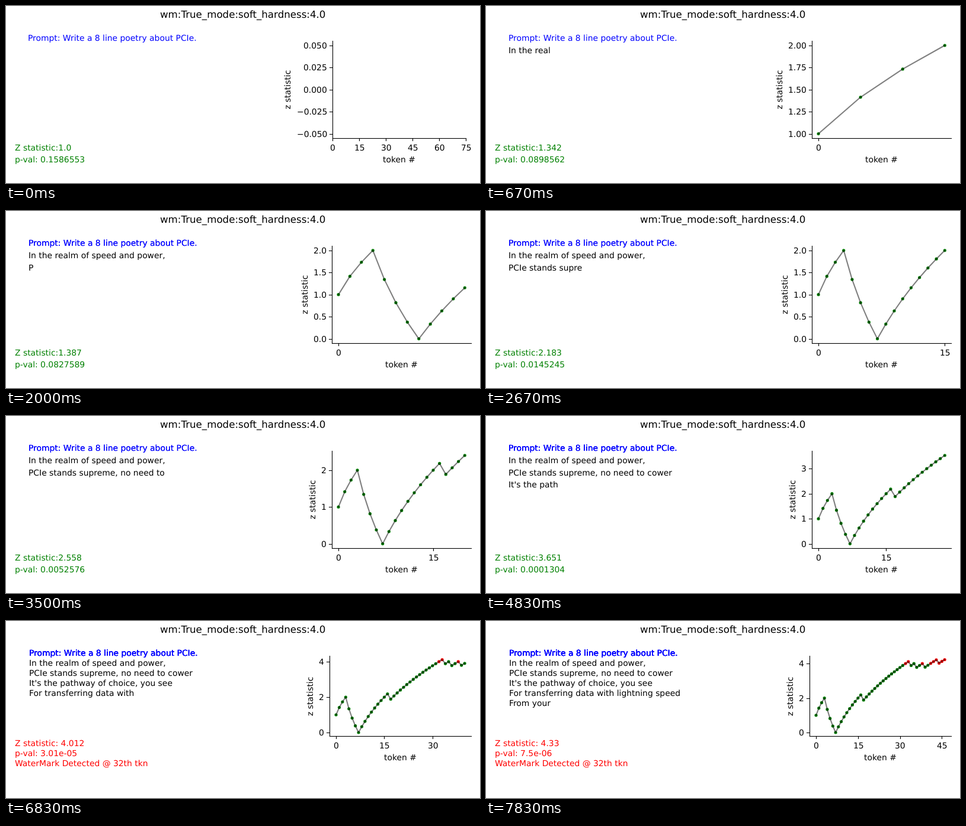
An HTML page with a canvas for the animation above (8 s loop, 800 by 300 pixels).

```html
<!DOCTYPE html>
<html lang="en">
<head>
<meta charset="utf-8">
<style>
  html, body { margin: 0; width: 100%; height: 100%; overflow: hidden; background: #fff; }
  canvas { display: block; width: 800px; height: 300px; }
</style>
</head>
<body>
<canvas width="800" height="300"></canvas>
<script>
const ctx = document.querySelector('canvas').getContext('2d');
const GREEN = '#008000', RED = '#ff0000', BLACK = '#000', BLUE = '#0000ff';
const LOOP = 8000, STEPS = 48, THRESHOLD = 4, TICK = 4.86;
const PROMPT = 'Prompt: Write a 8 line poetry about PCIe.';
const TOKENS = ('|In| the| real|m| of| speed| and| power|,|\n|P|CI|e| stands| supre|me|,| no| need| to' +
  '| c|ower|\n|It|\'|s| the| path|way| of| choice|,| you| see|\n|For| transfer|ring| data| with' +
  '| light|ning| speed|\n|From| your').split('|');

// One-proportion z statistic after each token; these tokens miss the green list.
const MISSES = new Set([4, 5, 6, 7, 17, 34, 36, 39, 44]);
let hits = 0;
const scores = Array.from({ length: STEPS }, (_, i) => {
  if (!MISSES.has(i)) hits++;
  return (2 * hits - i - 1) / Math.sqrt(i + 1);
});
const detectedAt = scores.findIndex(z => z > THRESHOLD);

// Upper tail of the normal distribution, by Simpson's rule.
function pValue(z) {
  const n = 1000, h = 8 / n;
  let sum = 0;
  for (let i = 0; i <= n; i++) {
    const weight = i === 0 || i === n ? 1 : i % 2 ? 4 : 2;
    sum += weight * Math.exp(-((z + i * h) ** 2) / 2);
  }
  return sum * h / 3 / Math.sqrt(2 * Math.PI);
}

function formatFloat(value, digits) {
  const v = +value.toFixed(digits);
  if (Number.isInteger(v)) return v.toFixed(1);
  return v < 1e-4 ? v.toExponential().replace('e-', 'e-0') : String(v);
}

function paddedLimits(lo, hi) {
  if (lo === hi) {
    const grow = 0.05 * (Math.abs(lo) || 1);
    lo -= grow;
    hi += grow;
  }
  const pad = (hi - lo) * 0.05;
  return [lo - pad, hi + pad];
}

function niceTicks([lo, hi], bins) {
  const raw = (hi - lo) / bins, power = 10 ** Math.floor(Math.log10(raw));
  const step = +([1, 2, 2.5, 5, 10].find(s => s * power >= raw) * power).toPrecision(3);
  const digits = (String(step).split('.')[1] || '').length;
  const ticks = [];
  for (let i = Math.ceil(lo / step); i * step <= hi; i++) {
    const label = Math.abs(i * step).toFixed(digits);
    ticks.push({ value: i * step, label: (i < 0 ? '\u2212' : '') + label });
  }
  return ticks;
}

function layoutFor(step) {
  if (step === 0) return { textX: 37, left: 551.4, right: 776.2, top: 59.3, bottom: 224.1 };
  if (step < detectedAt) return { textX: 38, left: 550.4, right: 785, top: 59.3, bottom: 224.1 };
  return { textX: 39, left: 546.2, right: 785, top: 59.3, bottom: 195.2 };
}

// Text starts on whole pixels; align is the fraction of its width left of x. Returns the width.
function write(text, x, y, color = BLACK, align = 0, size = 13.889) {
  ctx.font = `${size}px "DejaVu Sans", sans-serif`;
  ctx.fillStyle = color;
  const { width } = ctx.measureText(text);
  ctx.fillText(text, Math.round(x - align * width), Math.round(y));
  return width;
}

// Axis strokes are slightly wider than one pixel.
function bar(x, y, width, height) {
  ctx.fillStyle = BLACK;
  ctx.fillRect(Math.round(x) - 0.055, Math.round(y) - 0.055, width + 0.11, height + 0.11);
}

function drawPoem(step, box) {
  const lines = TOKENS.slice(0, step).join('').split('\n');
  const spacing = (box.bottom - box.top) / 8;
  // The prompt is overprinted once per line, which thickens it.
  lines.forEach((line, i) => {
    write(PROMPT, box.textX, box.top, BLUE);
    write(line, box.textX, box.top + (i + 1) * spacing);
  });

  const z = scores[step], over = z > THRESHOLD, color = over ? RED : GREEN;
  write(`Z statistic:${over ? ' ' : ''}${formatFloat(z, 3)}`, 15, box.bottom + spacing, color);
  write(`p-val: ${formatFloat(pValue(z), 7)}`, 15, box.bottom + 2 * spacing, color);
  if (step >= detectedAt) {
    write(`WaterMark Detected @ ${detectedAt}th tkn`, 15, box.bottom + 3 * spacing, RED);
  }
}

function drawChart(step, { left, right, top, bottom }) {
  const points = scores.slice(0, step);
  const xLimits = step ? paddedLimits(0, step - 1) : [0, 75];
  const yLimits = step ? paddedLimits(Math.min(...points), Math.max(...points)) : paddedLimits(0, 0);
  const toX = v => left + (v - xLimits[0]) / (xLimits[1] - xLimits[0]) * (right - left);
  const toY = v => bottom - (v - yLimits[0]) / (yLimits[1] - yLimits[0]) * (bottom - top);

  points.forEach((z, i) => {
    ctx.fillStyle = z > THRESHOLD ? RED : GREEN;
    ctx.beginPath();
    ctx.arc(toX(i), toY(z), 2.6, 0, 2 * Math.PI);
    ctx.fill();
  });
  ctx.beginPath();
  points.forEach((z, i) => ctx.lineTo(toX(i), toY(z)));
  ctx.strokeStyle = 'rgba(0, 0, 0, 0.5)';
  ctx.lineWidth = 2.08;
  ctx.lineJoin = 'round';
  ctx.lineCap = 'square';
  ctx.stroke();

  bar(left, top, 1, Math.round(bottom) - Math.round(top) + 1);
  bar(left, bottom, Math.round(right) - Math.round(left) + 1, 1);

  for (let v = 0; v <= xLimits[1]; v += 15) {
    bar(toX(v), bottom, 1, 5);
    write(v, toX(v) + 0.5, bottom + 21, BLACK, 0.5);
  }
  const bins = Math.floor((bottom - top) * 0.72 / 20);
  let labelWidth = 0;
  for (const { value, label } of niceTicks(yLimits, bins)) {
    const y = toY(value);
    bar(left - 5, y, 5, 1);
    labelWidth = Math.max(labelWidth, write(label, left - 2 * TICK + 0.5, y + 5.1, BLACK, 1));
  }

  write('token #', (left + right) / 2, bottom + 41, BLACK, 0.5);
  ctx.save();
  ctx.translate(Math.round(left - 2 * TICK - labelWidth - 9.9), Math.ceil((top + bottom) / 2));
  ctx.rotate(-Math.PI / 2);
  write('z statistic', 0, 0, BLACK, 0.5);
  ctx.restore();
}

function draw(step) {
  const box = layoutFor(step);
  ctx.fillStyle = '#fff';
  ctx.fillRect(0, 0, 800, 300);
  write('wm:True_mode:soft_hardness:4.0', 400, 20, BLACK, 0.5, 16.667);
  drawPoem(step, box);
  drawChart(step, box);
}

ctx.textRendering = 'geometricPrecision';
function tick() {
  const time = performance.now() % LOOP;
  draw(Math.min(STEPS - 1, Math.floor(time * STEPS / LOOP + 0.02)));
  requestAnimationFrame(tick);
}
tick();
</script>
</body>
</html>
```
